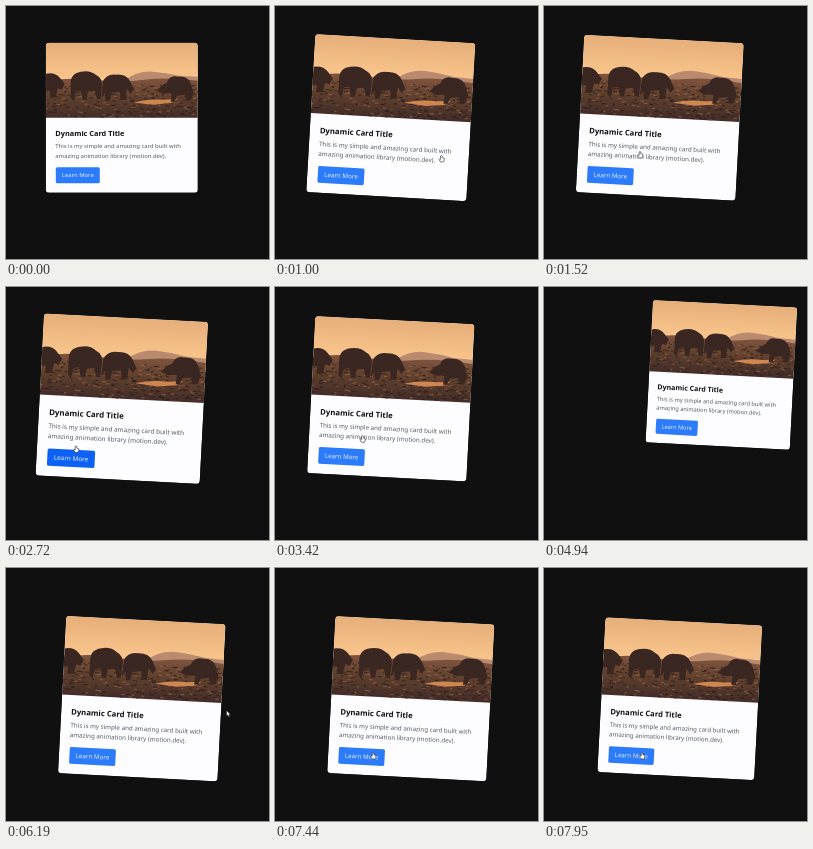
An HTML page that plays this animation: 263x253 px, repeating every 8000 ms.

```html
<!DOCTYPE html>
<html lang="en">
<head>
<meta charset="utf-8">
<title>Spring card</title>
<style>
  html, body { margin: 0; width: 100%; height: 100%; overflow: hidden; background: #101010; }
  svg { display: block; width: 263px; height: 253px; }
  text { font: 5.92px "Noto Sans", "Open Sans", sans-serif; fill: #555b66; }
  .title { font-size: 7.35px; font-weight: 600; fill: #101014; }
  .label { fill: #e6eeff; text-anchor: middle; }
</style>
</head>
<body>
<svg viewBox="0 0 263 253">
  <defs>
    <clipPath id="round"><rect width="152" height="150" rx="3.5"/></clipPath>
    <linearGradient id="sky" x2="0" y2="1">
      <stop offset="0" stop-color="#e6ae79"/>
      <stop offset="1" stop-color="#ffcb92"/>
    </linearGradient>
    <linearGradient id="ground" x2="0" y2="1">
      <stop offset="0" stop-color="#80543f"/>
      <stop offset=".4" stop-color="#64432f"/>
      <stop offset="1" stop-color="#432d28"/>
    </linearGradient>
  </defs>
  <g id="card">
    <g clip-path="url(#round)">
      <rect width="152" height="150" fill="#fdfdff"/>
      <rect width="152" height="45" fill="url(#sky)"/>
      <path d="M78 38Q92 28 106 29T134 33L152 34V46H78Z" fill="#b98a6e"/>
      <path d="M0 39Q24 34 50 37T98 37T152 38V75H0Z" fill="url(#ground)"/>
      <path id="grass" fill="none" stroke="#2f1f1c" stroke-width=".8"/>
      <path id="light" fill="none" stroke="#a86b48" stroke-width=".6"/>
      <path d="M88 60q14-4 30-3l14-1-6 4-18 2z" fill="#cf8650"/>
      <g fill="#3b2722">
        <path d="M0 31q9-2 14 4l5 6-3 6-4-2-2 10H4V48H0Z"/>
        <path d="M25 55V42q-1-11 10-13 9-2 15 3 7 3 6 12l-1 12h-4l-2-8-7 1-1 8h-4l-2-9-5 1-2 10Z"/>
        <path d="M56 56l1-17q4-8 13-7 10-1 14 6l4 8-3 5-4-5-1 11h-5l-1-8-8 1-2 8h-4l-1-8Z"/>
        <path d="M111 48q5-6 10-8 3-8 11-6 10-1 13 7l3 9-3 8h-4l-2-6-8 1-2 6h-4l1-9-8 1Z"/>
      </g>
      <text class="title" x="9.5" y="93.5">Dynamic Card Title</text>
      <text x="9.5" y="105.7">This is my simple and amazing card built with</text>
      <text x="9.5" y="115">amazing animation library (motion.dev).</text>
      <rect id="button" x="10" y="124.5" width="44" height="16" rx="1.5"/>
      <text class="label" x="32" y="134.6">Learn More</text>
    </g>
  </g>
  <g id="cursor" fill="#fff" stroke="#222" stroke-width=".7" stroke-linejoin="round">
    <path id="arrow" d="M0 0V6.5L1.6 5.2 2.7 7.6 3.8 7 2.8 4.8H4.8Z"/>
    <path id="hand" d="M-1 0Q0-1.2 1 0V2L3.4 2.7 3.2 5.4 2.4 7H-1L-2.8 4.2-2 3.2-1 4Z"/>
  </g>
</svg>
<script>
const LOOP = 8000, HOVER = 880, DRAG = 3930, RELEASE = 5150;
const presses = [[2390, 2585], [3850, RELEASE], [7430, 7600]];
const dragPath = [ // time, x and y offset
  [DRAG, 0, 0], [4150, 58.5, 39.5], [4290, 45, 62], [4400, 5, 55], [4510, -28, 20],
  [4620, -12, -14], [4720, 25, -22], [4850, 58, -31], [4940, 61.5, -24], [5040, 70, 10],
  [RELEASE, 50, 42]
];
const cursorPath = [ // time, x, y
  [900, 190, 150], [1200, 120, 150], [1520, 96, 146], [2050, 96, 146], [2390, 70, 159.5],
  [3220, 70, 159.5], [3800, 120, 130], [5650, 165, 160], [5900, 238, 150], [6190, 220.5, 142.5],
  [6960, 220.5, 142.5], [7040, 150, 165], [7220, 98, 185], [LOOP, 98, 185]
];
const $ = id => document.getElementById(id);
const within = (t, [from, to]) => t >= from && t < to;

function segment(path, t) {
  let i = 0;
  while (i < path.length - 2 && t >= path[i + 1][0]) i++;
  const u = (t - path[i][0]) / (path[i + 1][0] - path[i][0]);
  return [i, Math.max(0, Math.min(1, u))];
}

function linear(path, t, k) {
  const [i, u] = segment(path, t);
  return path[i][k] + (path[i + 1][k] - path[i][k]) * u;
}

function smooth(path, t, k) {
  const [i, u] = segment(path, t), a = path[i], b = path[i + 1];
  const slope = j => path[j - 1] && path[j + 1]
    ? (path[j + 1][k] - path[j - 1][k]) / (path[j + 1][0] - path[j - 1][0]) : 0;
  const d = b[0] - a[0], v = 1 - u;
  return a[k] * v * v * (1 + 2 * u) + b[k] * u * u * (3 - 2 * u)
    + d * u * v * (slope(i) * v - slope(i + 1) * u);
}

function spring(value, damping) {
  let speed = 0;
  return {
    get value() { return value; },
    set(v) { value = v; speed = 0; },
    step(target) {
      speed += (300 * (target - value) - damping * speed) / 1000;
      value += speed / 1000;
    }
  };
}

// Scattered blades give the plain its rough texture.
let seed = 7;
const random = () => (seed = seed * 16807 % 2147483647) / 2147483647;
function scatter(id, count) {
  let d = "";
  for (let i = 0; i < count; i++) {
    d += `M${random() * 152} ${42 + random() * 33}l${1 + random() * 3} ${random() - 0.5}`;
  }
  $(id).setAttribute("d", d);
}
scatter("grass", 230);
scatter("light", 90);

// The springs are solved once, one pose per millisecond.
const poses = [];
const x = spring(0, 22), y = spring(0, 22), scale = spring(1, 10), turn = spring(0, 10);
for (let t = 0; t < LOOP; t++) {
  const hovered = t >= HOVER, pressed = presses.some(p => within(t, p));
  scale.step(pressed ? 0.95 : hovered ? 1.05 : 1);
  turn.step(hovered ? 3 : 0);
  if (within(t, [DRAG, RELEASE])) {
    x.set(smooth(dragPath, t, 1));
    y.set(smooth(dragPath, t, 2));
  } else if (t >= RELEASE) {
    x.step(20);
    y.step(19);
  }
  poses.push([x.value, y.value, scale.value, turn.value]);
}

function draw(now) {
  const t = now % LOOP, [dx, dy, s, r] = poses[Math.floor(t)];
  $("card").setAttribute("transform",
    `translate(${115.8 + dx} ${111.7 + dy}) rotate(${r}) scale(${s}) translate(-76 -75)`);
  $("button").setAttribute("fill", within(t, [2300, 3400]) ? "#0d62f5" : "#2b7bfa");

  const cx = linear(cursorPath, t, 1), cy = linear(cursorPath, t, 2);
  const shown = within(t, [900, 3850]) || t >= 5650;
  const outside = within(t, [5800, 7000]);
  $("cursor").setAttribute("transform", `translate(${cx} ${cy}) scale(.85)`);
  $("arrow").style.display = shown && outside ? "" : "none";
  $("hand").style.display = shown && !outside ? "" : "none";
  requestAnimationFrame(draw);
}
requestAnimationFrame(draw);
</script>
</body>
</html>
```
